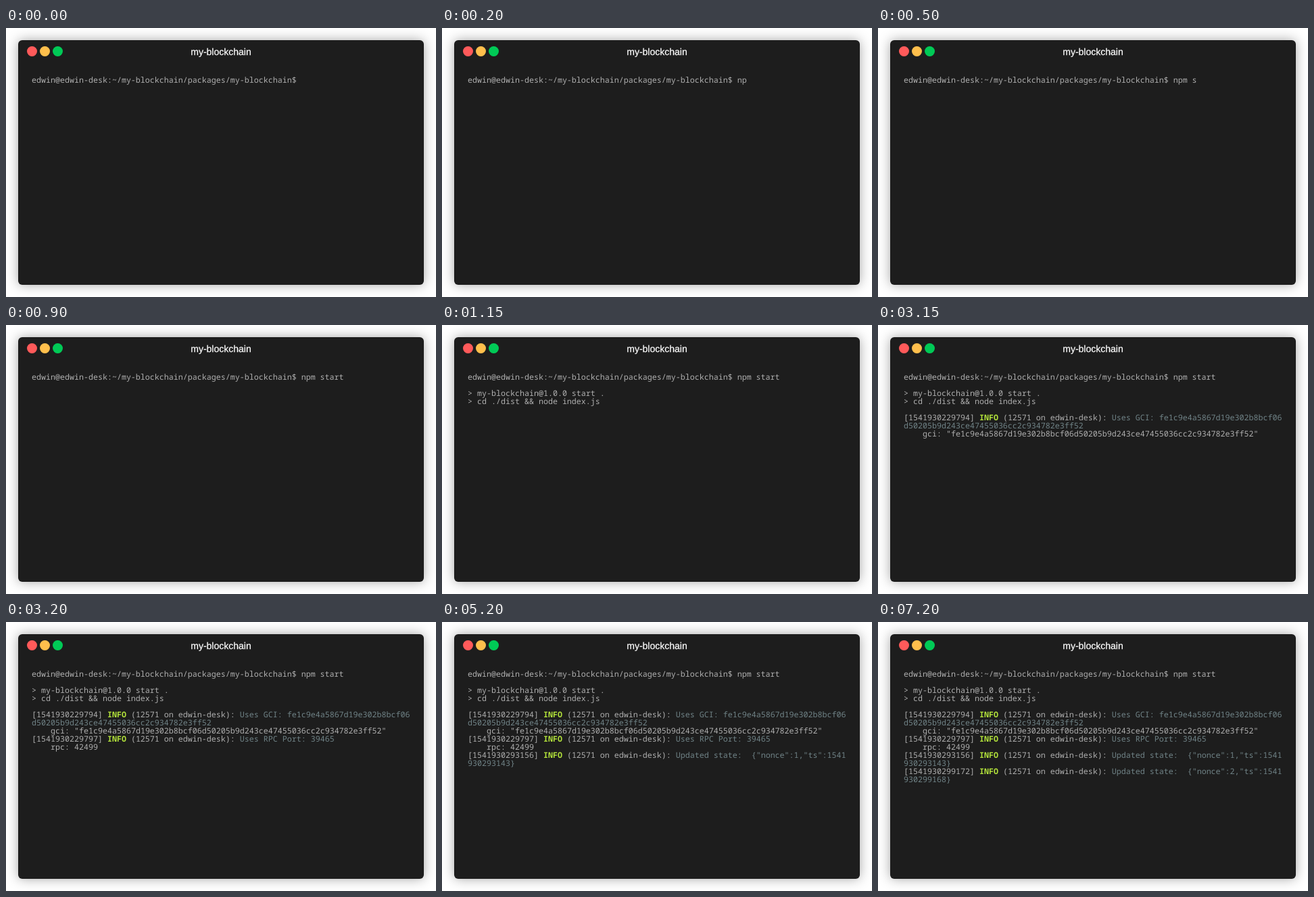
An HTML page for the animation above (8000 ms loop, 636x398 px).

```html
<!DOCTYPE html>
<html lang="en">
<head>
<meta charset="utf-8">
<title>my-blockchain</title>
<style>
  html, body { margin: 0; width: 100%; height: 100%; overflow: hidden; background: #fff; }
  .window {
    position: absolute; left: 18px; top: 18px; width: 600px; height: 362px;
    border-radius: 6px; background: #1d1d1d; box-shadow: 0 0 18px rgba(0, 0, 0, .35);
  }
  svg { position: absolute; left: 0; top: 0; }
  text {
    font: 11.667px "Noto Sans Mono", "DejaVu Sans Mono", monospace;
    fill: #afafaf; white-space: pre; text-rendering: geometricPrecision;
  }
  .title { font: 14px "Liberation Sans", Arial, sans-serif; fill: #fff; stroke: #fff; stroke-width: .25px; text-anchor: middle; }
  .info { fill: #b3e33b; font-weight: 700; }
  .msg { fill: #708387; }

  /* The cover slides right one 7px cell per typed key. */
  .cover { fill: #1d1d1d; animation: type 8s infinite; }
  @keyframes type {
    0% { transform: translateX(0); animation-timing-function: steps(9, end); }
    11.25%, 100% { transform: translateX(63px); }
  }

  .out { animation: 8s step-end infinite; }
  .start { animation-name: start; }
  .gci { animation-name: gci; }
  .rpc { animation-name: rpc; }
  .first { animation-name: first; }
  .second { animation-name: second; }
  @keyframes start { 0% { visibility: hidden; } 14.375%, 100% { visibility: visible; } }
  @keyframes gci { 0% { visibility: hidden; } 39.375%, 100% { visibility: visible; } }
  @keyframes rpc { 0% { visibility: hidden; } 40%, 100% { visibility: visible; } }
  @keyframes first { 0% { visibility: hidden; } 65%, 100% { visibility: visible; } }
  @keyframes second { 0% { visibility: hidden; } 90%, 100% { visibility: visible; } }
</style>
</head>
<body>
<div class="window"></div>
<svg width="636" height="398" viewBox="0 0 636 398">
  <circle cx="38.5" cy="34.5" r="7.5" fill="#ff5a5a"/>
  <circle cx="57.5" cy="34.5" r="7.5" fill="#ffbf4c"/>
  <circle cx="76.5" cy="34.5" r="7.5" fill="#00ca56"/>
  <text class="title" x="318" y="40">my-blockchain</text>

  <text x="38" y="81">edwin@edwin-desk:~/my-blockchain/packages/my-blockchain$ npm start</text>
  <rect class="cover" x="437" y="69" width="70" height="16"/>

  <g class="out start">
    <text x="38" y="105">&gt; my-blockchain@1.0.0 start .</text>
    <text x="38" y="117">&gt; cd ./dist &amp;&amp; node index.js</text>
  </g>
  <g class="out gci">
    <text x="38" y="141">[1541930229794] <tspan class="info">INFO</tspan> (12571 on edwin-desk): <tspan class="msg">Uses GCI: fe1c9e4a5867d19e302b8bcf06</tspan></text>
    <text class="msg" x="38" y="153">d50205b9d243ce47455036cc2c934782e3ff52</text>
    <text x="66" y="165">gci: "fe1c9e4a5867d19e302b8bcf06d50205b9d243ce47455036cc2c934782e3ff52"</text>
  </g>
  <g class="out rpc">
    <text x="38" y="177">[1541930229797] <tspan class="info">INFO</tspan> (12571 on edwin-desk): <tspan class="msg">Uses RPC Port: 39465</tspan></text>
    <text x="66" y="189">rpc: 42499</text>
  </g>
  <g class="out first">
    <text x="38" y="201">[1541930293156] <tspan class="info">INFO</tspan> (12571 on edwin-desk): <tspan class="msg">Updated state:  {"nonce":1,"ts":1541</tspan></text>
    <text class="msg" x="38" y="213">930293143}</text>
  </g>
  <g class="out second">
    <text x="38" y="225">[1541930299172] <tspan class="info">INFO</tspan> (12571 on edwin-desk): <tspan class="msg">Updated state:  {"nonce":2,"ts":1541</tspan></text>
    <text class="msg" x="38" y="237">930299168}</text>
  </g>
</svg>
</body>
</html>
```
